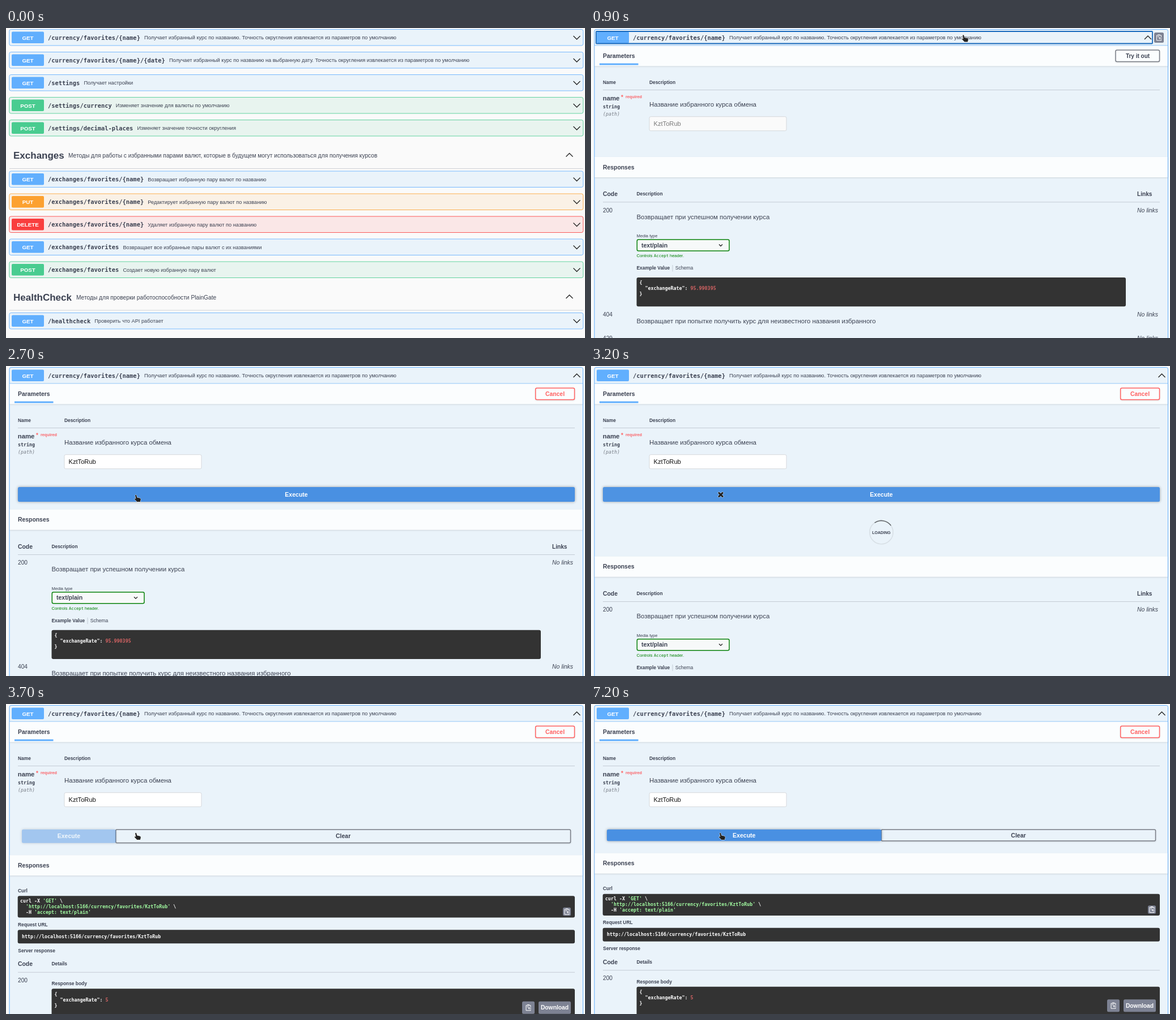
An HTML page that plays this animation: 1022 by 548 pixels, repeating every 8.1 s.

```html
<!DOCTYPE html>
<html lang="ru">
<head>
<meta charset="utf-8">
<title>API</title>
<style>
html, body { margin: 0; width: 100%; height: 100%; overflow: hidden; background: #fafafa; }
svg { display: block; }
text { font-family: "Liberation Sans", Arial, sans-serif; fill: #3b4151; white-space: pre; }
.b { font-weight: 700; }
.i { font-style: italic; }
.m { font-family: "DejaVu Sans Mono", "Noto Sans Mono", monospace; }
.mid { text-anchor: middle; }
.w { fill: #fff; }
.ln { fill: none; stroke: #222; stroke-width: 1.3; }
.rule { stroke: #3b4151; stroke-opacity: .22; }
.dark { fill: #333; }
.grey { fill: #7d8293; }
.bar { fill: #fbfdfe; filter: drop-shadow(0 1px 1px rgba(0,0,0,.13)); }
.btn { fill: #fbfdfe; stroke: #777b84; stroke-width: 1.5; filter: drop-shadow(0 1px 1px rgba(0,0,0,.12)); }
#clear .btn { fill: #eaf3fa; }
.lift { filter: drop-shadow(0 0 2.5px rgba(0,0,0,.35)); }
.cur { fill: #222; stroke: #fff; stroke-width: 1; stroke-linejoin: round; paint-order: stroke; }
</style>
</head>
<body>
<svg id="stage" width="1022" height="548" viewBox="0 0 1022 548"></svg>
<script>
const COLORS = { GET: '#61affe', POST: '#49cc90', PUT: '#fca130', DELETE: '#f93e3e' };
const TINTS = { GET: '#eaf3fa', POST: '#e8f4ef', PUT: '#faf1e6', DELETE: '#fae7e7' };
const LOOP = 8100, STEP = 100;

const text = (x, y, size, str, cls = '', extra = '') =>
  `<text x="${x}" y="${y}" font-size="${size}" class="${cls}" ${extra}>${str}</text>`;
const rect = (x, y, w, h, r, attrs) =>
  `<rect x="${x}" y="${y}" width="${w}" height="${h}" rx="${r}" ${attrs}/>`;
const rule = (y, x = 21, x2 = 1004) => `<path d="M${x} ${y}H${x2}" class="rule"/>`;
const chevron = (x, y, dir, r = 6) =>
  `<path d="M${x - r} ${y - dir * r / 2}l${r} ${dir * r}l${r} ${-dir * r}" class="ln"/>`;
const group = (id, body) => `<g id="${id}">${body}</g>`;
const fill = c => `fill="${c}"`;
const span = (c, s) => `<tspan fill="${c}">${s}</tspan>`;
const code = (x, y, str) => text(x, y, 8.32, str, 'm b w');
const label = (x, y, str) => text(x, y, 8.4, str, 'b');
const head = (x, y, str) => text(x, y, 10.4, str, 'b');

function summary(c, method, path, note) {
  return rect(10, c - 10.5, 57, 20.5, 2, fill(COLORS[method])) +
    text(38.5, c + 3.5, 9.8, method, 'b w mid') +
    text(74, c + 3.5, 10.42, path, 'm b') +
    text(81 + 6.27 * path.length, c + 3, 9.23, note);
}

function row(c, method, path, note) {
  return rect(5.8, c - 14.5, 1013, 28.5, 3,
    `fill="${TINTS[method]}" stroke="${COLORS[method]}" stroke-width=".85"`) +
    summary(c, method, path, note) + chevron(1007.5, c, 1);
}

const section = (c, x, title, note) =>
  text(13, c + 6, 17, title, 'b') + text(x, c + 4, 10.21, note) +
  chevron(994.5, c - .5, -1) + rule(c + 23.5, 6, 1019);

function copyButton(x, y, w, h) {
  const cx = x + w / 2, cy = y + h / 2;
  return rect(x, y, w, h, 2.5, 'class="grey"') +
    `<path d="M${cx + 4} ${cy - 1}V${cy - 4}H${cx - 4}V${cy + 5}H${cx + 4}V${cy + 3}` +
    `M${cx - 2} ${cy - 5}h4M${cx + 5} ${cy + 1}h-5m2 -2l-2 2l2 2M${cx - 2.5} ${cy - 1.5}h3" ` +
    'fill="none" stroke="#fff" stroke-width="1"/>';
}

const first = ['GET', '/currency/favorites/{name}',
  'Получает избранный курс по названию. Точность округления извлекается из параметров по умолчанию'];
const fav = '/exchanges/favorites', favName = fav + '/{name}';

const list =
  row(17, ...first) +
  row(57, 'GET', '/currency/favorites/{name}/{date}', 'Получает избранный курс по названию на выбранную дату. Точность округления извлекается из параметров по умолчанию') +
  row(97, 'GET', '/settings', 'Получает настройки') +
  row(137, 'POST', '/settings/currency', 'Изменяет значение для валюты по умолчанию') +
  row(177, 'POST', '/settings/decimal-places', 'Изменяет значение точности округления') +
  section(225, 110, 'Exchanges', 'Методы для работы с избранными парами валют, которые в будущем могут использоваться для получения курсов') +
  row(267.5, 'GET', favName, 'Возвращает избранную пару валют по названию') +
  row(307.5, 'PUT', favName, 'Редактирует избранную пару валют по названию') +
  row(347.5, 'DELETE', favName, 'Удаляет избранную пару валют по названию') +
  row(387.5, 'GET', fav, 'Возвращает все избранные пары валют с их названиями') +
  row(427.5, 'POST', fav, 'Создает новую избранную пару валют') +
  section(475.5, 124, 'HealthCheck', 'Методы для проверки работоспособности PlainGate') +
  row(518, 'GET', '/healthcheck', 'Проверить что API работает');

const params =
  rect(6, 2.5, 1012.5, 600, 3, `fill="${TINTS.GET}" stroke="#61affe"`) +
  `<path d="M6 31H1018" stroke="#61affe" stroke-opacity=".8"/>` +
  summary(17, ...first) +
  group('ring', rect(9, 6, 982, 21.5, 1, 'fill="none" stroke="#1a6abc" stroke-width="1.8"')) +
  group('copy', copyButton(994, 8, 17, 18)) +
  group('arrow', chevron(0, 17, -1)) +
  rect(6.6, 31.5, 1011.4, 35.8, 0, 'class="bar"') +
  head(21, 53, 'Parameters') +
  rect(15, 62.5, 68.5, 3, 0, fill('#61affe')) +
  group('try', rect(926, 39, 77.5, 20.5, 2.5, 'class="btn"') + text(965, 53, 10, 'Try it out', 'b mid')) +
  group('cancel', rect(934.7, 39, 68.8, 20.5, 2.5, 'class="btn"') + text(969, 53, 10.4, 'Cancel', 'b mid')) +
  label(21, 98.5, 'Name') + label(103, 98.5, 'Description') + rule(109.5) +
  text(20.7, 128, 11.4, 'name', 'b') +
  text(53, 126, 10, '*', 'b', 'style="fill:#ff6464"') +
  text(61, 123.5, 7.25, 'required', 'b', 'style="fill:#fb6368"') +
  text(21, 141.5, 8.32, 'string', 'm b') +
  text(21, 154.5, 8.32, '(path)', 'm i', 'style="fill:#777c85"') +
  text(103, 139, 11.42, 'Название избранного курса обмена') +
  rect(103, 156.7, 242, 25, 2.5, 'id="field" stroke="#d5d8dc"') +
  text(110.5, 173, 11.15, 'KztToRub', '', 'id="value"');

const buttons = group('actions',
  group('clear', rect(0, 222.3, 10, 20, 2, 'class="btn"') + text(0, 0, 10.5, 'Clear', 'b mid')) +
  group('exec', rect(21, 214, 983, 26, 2.5, fill('#4990e2')) + text(0, 0, 10.5, 'Execute', 'b w mid')));

const loader = group('loader',
  '<circle cx="512.5" cy="294" r="20.7" fill="none" stroke="#555" stroke-opacity=".12" stroke-width="1.5"/>' +
  '<path id="arc" d="M497.9 279.4A20.7 20.7 0 0 1 527.1 279.4" fill="none" stroke="#000" stroke-opacity=".55" stroke-width="1.6"/>' +
  text(512.5, 296.7, 7.1, 'LOADING', 'b mid'));

// Everything below the form is laid out from the top of its heading bar.
const answer = (y, status, note) =>
  text(21, y, 10.2, status) + text(964, y, 10.4, 'No links', 'i') + text(80.5, y + 12, 11.42, note);
const json = (y, num) =>
  code(85.5, y, '{') + code(85.5, y + 10, '  "exchangeRate": ' + span('#d36363', num)) + code(85.5, y + 20, '}');
const green = 'style="fill:#008000"';

const docs = group('docs',
  head(21, 69, 'Code') + label(80.5, 68, 'Description') + text(964, 69, 10.1, 'Links', 'b') + rule(79.8) +
  answer(97.5, '200', 'Возвращает при успешном получении курса') +
  text(80.5, 142.3, 7.56, 'Media type') +
  rect(81.3, 146, 162.7, 20, 2.5, 'fill="#f7f9f9" stroke="#0a820a" stroke-width="1.5"') +
  text(89, 159.7, 10.5, 'text/plain', 'b') + chevron(229, 156, 1, 3) +
  text(80.5, 177.3, 7.5, 'Controls', '', green) + text(111, 177.3, 7.2, 'Accept', 'm', green) +
  text(139, 177.3, 7.5, 'header.', '', green) +
  label(80.5, 199.3, 'Example Value') + '<path d="M144 191v11.5" class="rule"/>' + text(148.7, 199.3, 8.6, 'Schema') +
  rect(80.5, 213, 863.5, 51.2, 3, 'class="dark"') + json(225, '95.990395') +
  answer(281.7, '404', 'Возвращает при попытке получить курс для неизвестного названия избранного') +
  answer(323.8, '429', ''));

const url = 'http://localhost:5166/currency/favorites/KztToRub';
const lime = s => span('#a2fca2', `'${s}'`);
const result = group('result',
  label(21, 65.7, 'Curl') + rect(20.7, 72, 983.3, 38.3, 3, 'class="dark"') +
  code(25, 83.7, `curl -X ${lime('GET')} \\`) +
  code(25, 93.7, `  ${lime(url)} \\`) +
  code(25, 103.7, `  -H ${lime('accept: text/plain')}`) +
  copyButton(983, 92.5, 14, 14.5) +
  label(21, 125.7, 'Request URL') + rect(20.7, 132, 983.3, 24, 3, 'class="dark"') + code(28, 146.7, url) +
  label(21.3, 171.5, 'Server response') +
  head(21, 196, 'Code') + label(80.5, 195, 'Details') + rule(207) +
  text(21, 224.5, 10.2, '200') +
  label(80.5, 230, 'Response body') + rect(80.5, 236, 923.5, 80, 3, 'class="dark"') + json(248.3, '5') +
  copyButton(911, 258.5, 22, 22) +
  rect(940, 258.5, 57, 22, 2.5, 'class="grey"') + text(968.5, 273.2, 10.3, 'Download', 'b w mid'));

const responses = group('responses',
  rect(6.6, 0, 1011.4, 36, 0, 'class="bar"') + head(21, 21.7, 'Responses') + docs + result);

const cursor = group('cursor',
  '<path id="hand" class="cur" d="M-1 1Q0 -.5 1.2 1L2.3 5L7 6Q9.3 6.6 8.8 9L7.8 12.5H2.3L-2 8Q-2.4 6.6 -1 6.7L.3 7.6Z"/>' +
  '<path id="point" class="cur" d="M0 0V11L2.6 8.7L4.4 12.5L6.2 11.7L4.5 8H8Z"/>' +
  '<path id="stop" class="cur" d="M-5 -3L-3 -5L0 -2.2L3 -5L5 -3L2.2 0L5 3L3 5L0 2.2L-3 5L-5 3L-2.2 0Z"/>');

document.getElementById('stage').innerHTML =
  group('list', list) + group('panel', params + buttons + loader + responses) + cursor;

const $ = id => document.getElementById(id);
const show = (id, on) => $(id).setAttribute('display', on ? 'inline' : 'none');
const move = (id, x, y) => $(id).setAttribute('transform', `translate(${x} ${y})`);
const set = (el, attrs) => { for (const k in attrs) el.setAttribute(k, attrs[k]); };
const mix = (a, b, p) => `rgb(${a.map((v, i) => Math.round(v + (b[i] - v) * p))})`;

// CSS "ease": cubic-bezier(.25, .1, .25, 1)
function ease(x) {
  if (x <= 0) return 0;
  if (x >= 1) return 1;
  let lo = 0, hi = 1, s;
  for (let i = 0; i < 20; i++) {
    s = (lo + hi) / 2;
    const bx = .75 * s * (1 - s) + s ** 3;
    if (bx < x) lo = s; else hi = s;
  }
  return .3 * s * (1 - s) ** 2 + 3 * s * s * (1 - s) + s ** 3;
}

// time, x, y of the pointer's hot spot
const track = [
  [200, 690, 470], [300, 678, 300], [400, 667, 130], [500, 658, 40], [600, 657, 13], [900, 657, 12],
  [1000, 662, 16], [1100, 712, 28], [1200, 780, 40], [1300, 837, 45], [1400, 894, 50], [1500, 932, 51],
  [1600, 942, 51], [1700, 942, 51], [1800, 909, 53], [1900, 797, 80], [2000, 682, 105], [2100, 487, 182],
  [2200, 360, 207], [2300, 282, 222], [2400, 246, 227], [2700, 229, 227.5], [7100, 229, 227.5], [7200, 228, 227.5]
];
function at(t) {
  const i = track.findIndex(p => p[0] > t);
  if (i < 0) return track[track.length - 1].slice(1);
  const [a, b] = [track[i - 1], track[i]], p = (t - a[0]) / (b[0] - a[0]);
  return [a[1] + (b[1] - a[1]) * p, a[2] + (b[2] - a[2]) * p];
}

function placeButton(id, x, y, w, h) {
  const [box, caption] = $(id).children;
  set(box, { x, y, width: w, height: h });
  set(caption, { x: x + w / 2, y: y + h / 2 + 3.6 });
}

const OPEN = 700, TRY = 1700, RUN = 3200, DONE = 3700;

function draw(t) {
  const open = t >= OPEN, tried = t >= TRY, done = t >= DONE, busy = t >= RUN && !done;
  show('list', !open);
  show('panel', open);

  const near = t < 1200;
  show('ring', !tried);
  show('copy', near);
  move('arrow', near ? 983 : 1007.5, 0);
  set($('ring').firstChild, { width: near ? 982 : 1007 });

  show('try', !tried);
  show('cancel', tried);
  const p = ease((t - 1600) / 300), [box, word] = $('cancel').children;
  box.style.stroke = mix([105, 105, 110], [255, 96, 96], p);
  word.style.fill = mix([59, 65, 81], [255, 96, 96], p);
  $('try').classList.toggle('lift', t >= 1500);
  $('cancel').classList.toggle('lift', t < 1800);
  set($('field'), { fill: tried ? '#fff' : '#fafafa' });
  $('value').style.fill = tried ? '#111' : '#7a7a7a';

  show('actions', tried);
  show('clear', done);
  show('loader', busy);
  const grow = ease((t - 3652) / 300), rest = (1 - grow) * 4.5;
  if (done) {
    const w = 969 * grow / (1 + grow), h = 20.5 + rest;
    placeButton('exec', 28, 221.7, w, h);
    placeButton('clear', 28 + w, 222, 968.5 - w, h - .5);
  } else placeButton('exec', 21, 214, 983, 26);
  const faded = 1 - .7 * ease((t - 3180) / 300);
  $('exec').style.opacity = done ? .3 + .7 * grow : faded;
  $('exec').classList.toggle('lift', t >= 2300);
  set($('arc'), { transform: `rotate(${10 + (t - RUN) * .36} 512.5 294)` });

  move('responses', 0, done ? 263.7 + rest : busy ? 336.7 : tried ? 253.7 : 228);
  show('docs', !done);
  show('result', done);

  show('cursor', t >= 200);
  if (t >= 200) move('cursor', ...at(t));
  const hand = t < 1100 || (t >= 1500 && t < 1800) || t >= 2300;
  show('stop', busy);
  show('hand', hand && !busy);
  show('point', !hand);
}

let start, last;
function tick(now) {
  start ??= now;
  const t = Math.floor(((now - start) % LOOP) / STEP) * STEP;
  if (t !== last) draw(last = t);
  requestAnimationFrame(tick);
}
draw(0);
requestAnimationFrame(tick);
</script>
</body>
</html>
```
